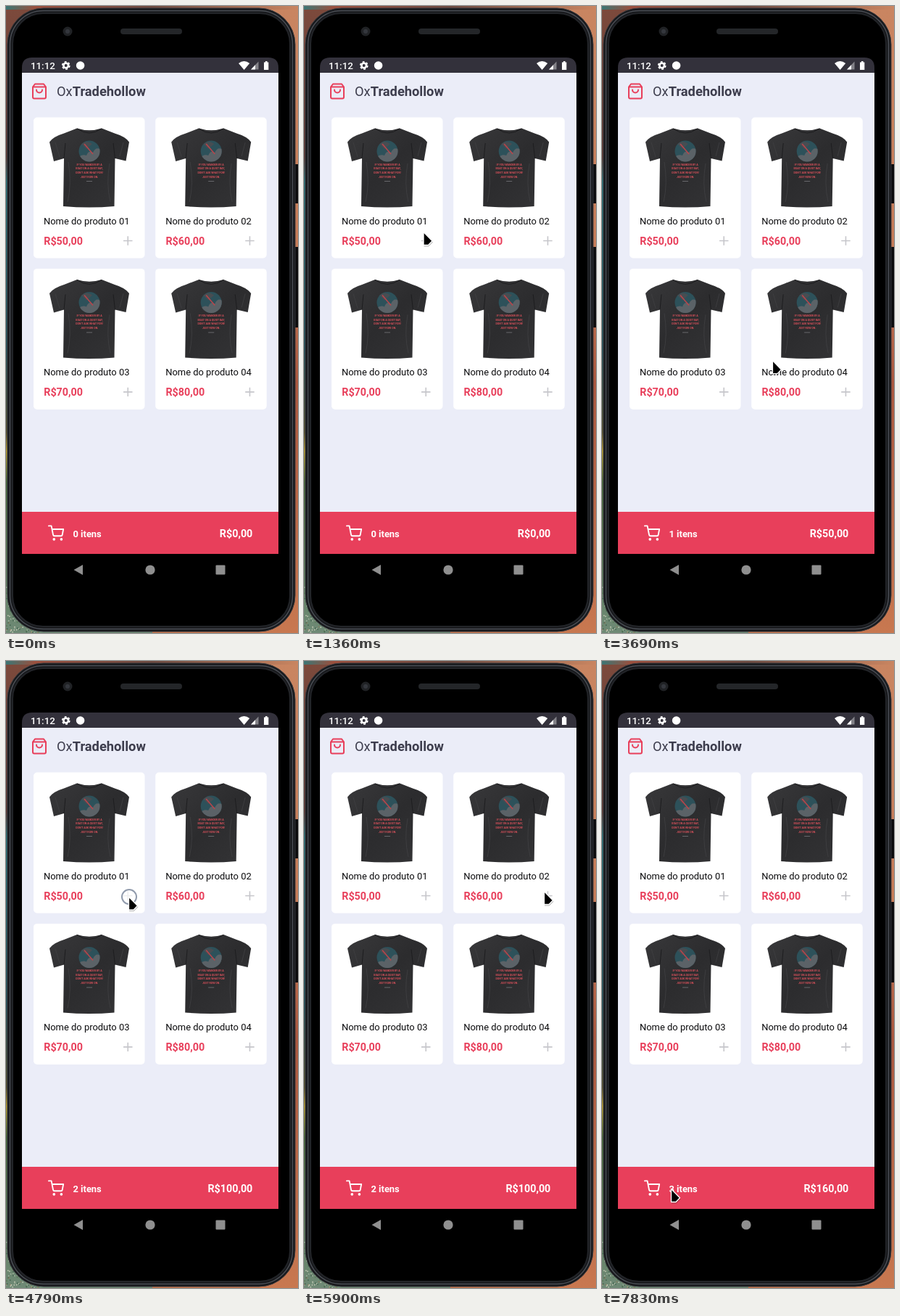
An HTML page that plays this animation: 403 by 864 pixels, repeating every 8000 ms.

```html
<!DOCTYPE html>
<html lang="pt">
<head>
<meta charset="utf-8">
<title>Shop cart</title>
<style>
  html, body { margin: 0; width: 100%; height: 100%; overflow: hidden; background: #000; }
  svg { display: block; width: 100vw; height: 100vh; font-family: Roboto, Arial, sans-serif; }
  .name { font-size: 12.95px; fill: #0c0c0e; }
  .price { font-size: 14.3px; font-weight: 700; fill: #e83f5b; }
  .print { font-size: 3.6px; font-weight: 700; fill: #d4505a; text-anchor: middle; }
  .total { font-size: 14.3px; font-weight: 700; fill: #fff; text-anchor: end; }
  .count { font-size: 12.9px; font-weight: 700; fill: #fff; }
  .line { fill: none; stroke-width: 2; stroke-linecap: round; stroke-linejoin: round; }
</style>
</head>
<body>
<svg viewBox="0 0 403 864" preserveAspectRatio="none">
  <defs>
    <linearGradient id="left" x2="0" y2="1">
      <stop offset="0" stop-color="#7d4a3c"/>
      <stop offset=".24" stop-color="#5d3a35"/>
      <stop offset=".28" stop-color="#2d7277"/>
      <stop offset=".55" stop-color="#28525a"/>
      <stop offset=".68" stop-color="#56502f"/>
      <stop offset=".71" stop-color="#b39a2e"/>
      <stop offset=".76" stop-color="#48693a"/>
      <stop offset="1" stop-color="#6f8a76"/>
    </linearGradient>
    <linearGradient id="right" x2="0" y2="1">
      <stop offset="0" stop-color="#c98561"/>
      <stop offset=".4" stop-color="#c67c58"/>
      <stop offset=".6" stop-color="#a9573f"/>
      <stop offset="1" stop-color="#c87850"/>
    </linearGradient>
    <linearGradient id="top">
      <stop offset="0" stop-color="#3c7674"/>
      <stop offset=".1" stop-color="#9a4f3d"/>
      <stop offset=".5" stop-color="#6d4a40"/>
      <stop offset="1" stop-color="#c98561"/>
    </linearGradient>
    <linearGradient id="cloth" x2="1" y2="1">
      <stop offset="0" stop-color="#38383a"/>
      <stop offset=".5" stop-color="#2c2c2e"/>
      <stop offset="1" stop-color="#343436"/>
    </linearGradient>
    <clipPath id="disc"><circle cx="115" cy="200" r="14.5"/></clipPath>

    <g id="shirt">
      <path fill="url(#cloth)" d="M98 168.5Q115 174 132 168.5L150 175.500Q165 180 170 187.500L165.500 213.500L150.500 210L149.500 276Q115 279 79 276L80 210L66 214L60 187.500Q65 180 80 175.500Z"/>
      <path fill="none" stroke="#1d1d1f" d="M98 169Q115 181 132 169M80 210L82 189M150.500 210L148 189"/>
      <path fill="none" stroke="#414143" stroke-width=".8" d="M86 215Q91 245 85 270M143 217Q138 245 144 270M68 188L74 208M162 188L157 207"/>
      <circle cx="115" cy="200" r="14.500" fill="#2d515a"/>
      <g clip-path="url(#disc)">
        <path fill="#5b6267" d="M98 211Q104 203 111 206Q114 198 120 202Q124 193 131 198V216H98Z"/>
        <path fill="#474d52" d="M104 190Q111 184 119 190L111 197Z"/>
        <path stroke="#b8454b" stroke-width="1.600" d="M108 190L120 204"/>
      </g>
      <g class="print">
        <text x="115" y="219.800">IF YOU WANDER BY A</text>
        <text x="115" y="225.400">BOAT ON A QUIET BAY,</text>
        <text x="115" y="231">DON'T ASK WHAT FOR!</text>
        <text x="115" y="236.600">JUST ROW ON.</text>
      </g>
      <path stroke="#77777a" stroke-width=".8" d="M111 241.500H119"/>
    </g>
  </defs>

  <!-- wallpaper -->
  <rect width="202" height="864" fill="url(#left)"/>
  <rect x="202" width="201" height="864" fill="url(#right)"/>
  <rect width="403" height="5" fill="url(#top)"/>
  <g id="specks"></g>

  <!-- phone -->
  <path fill="#0b0b0d" d="M398 218h5v54h-5zM398 332h5v111h-5z"/>
  <rect x="2" y="3" width="397" height="859" rx="50" fill="#17181b" stroke="#34373c"/>
  <rect x="5.500" y="6.500" width="390" height="852" rx="46" fill="none" stroke="#4a4e55" stroke-width="1.500"/>
  <rect x="9" y="10" width="383" height="845" rx="42" fill="#000" stroke="#222428" stroke-width="2"/>
  <circle cx="85" cy="35" r="6.500" fill="#202225"/>
  <circle cx="85" cy="35" r="3" fill="#34373d"/>
  <rect x="158" y="31" width="85" height="8" rx="4" fill="#242629"/>

  <!-- status bar -->
  <path fill="#33313b" d="M22 92.500V85Q22 71 36 71H362Q376 71 376 85V92.500Z"/>
  <g fill="#fff">
    <text x="34" y="86.700" font-size="13.300" font-weight="500">11:12</text>
    <g fill="none" stroke="#fff">
      <circle cx="82.700" cy="82" r="3.300" stroke-width="2.600"/>
      <circle cx="82.700" cy="82" r="5" stroke-width="1.800" stroke-dasharray="2.800 2.436"/>
    </g>
    <circle cx="102.600" cy="82" r="5.800"/>
    <path d="M321 79Q328.500 73 336.200 79L328.600 88Z"/>
    <path opacity=".4" d="M338 87.500L348.500 76.500V87.500Z"/>
    <path d="M338 87.500L344 81.200V87.500Z"/>
    <path d="M356 77.500H358V76H360.500V77.500H362.300V88H356Z"/>
  </g>

  <!-- app -->
  <rect x="22" y="92" width="354" height="605" fill="#ebedf8"/>
  <g class="line" stroke="#e83f5b" transform="translate(34 105.500)">
    <path d="M6 2L3 6v14a2 2 0 0 0 2 2h14a2 2 0 0 0 2-2V6l-3-4zM3 6H21M16 10a4 4 0 0 1-8 0"/>
  </g>
  <text x="70" y="124" font-size="18.300" fill="#3d3d4d">Ox<tspan font-weight="700">Tradehollow</tspan></text>
  <g id="cards"></g>

  <rect x="22" y="697" width="354" height="58" fill="#e83f5b"/>
  <g class="line" stroke="#fff" transform="translate(58 715.500) scale(.92)">
    <path d="M1 1h4l2.680 13.390a2 2 0 0 0 2 1.610h9.720a2 2 0 0 0 2-1.610L23 6H6"/>
    <circle cx="9" cy="21" r="1"/><circle cx="20" cy="21" r="1"/>
  </g>
  <text id="count" class="count" x="92.500" y="731.800"></text>
  <text id="total" class="total" x="340.300" y="732"></text>

  <!-- navigation -->
  <g fill="#8f8f8f">
    <path d="M93.500 777L106 770V784Z"/>
    <circle cx="199" cy="777" r="6.600"/>
    <rect x="289.500" y="770.500" width="13" height="13" rx="1"/>
  </g>

  <circle id="ring" fill="#fff" fill-opacity=".72" stroke="#8f99ab" stroke-width="2"/>
  <g id="cursor">
    <path d="M.5 1.500L13 14L7 20H.5Z" fill="#000" opacity=".25"/>
    <path d="M0 0L12 12.300L6.500 18H0Z" fill="#000" stroke="#fff" stroke-width="1.300" stroke-linejoin="round"/>
  </g>
</svg>

<script>
const LOOP = 8000, STEP = 40;
const $ = id => document.getElementById(id);
const money = n => `R$${n},00`;

// Each move is a run of [time, x, y]; the pointer rests between moves.
const moves = [
  [[600, 398, 631], [720, 330, 560], [880, 210, 420], [1040, 110, 320], [1120, 85, 294],
   [1240, 122, 297], [1360, 165, 311.5], [1400, 164, 313]],
  [[1440, 161, 314], [1520, 156, 319], [1600, 160, 324]],
  [[1800, 161, 324], [1860, 162.5, 324]],
  [[3030, 162.5, 324], [3150, 185, 400], [3330, 290, 640], [3450, 322, 734],
   [3560, 300, 650], [3710, 212, 430], [3810, 181, 345]],
  [[3880, 179, 342], [4080, 166.500, 324], [4210, 169.5, 325]],
  [[5090, 169.5, 325], [5200, 147, 420], [5320, 134, 590], [5400, 148, 655],
   [5600, 250, 510], [5780, 320, 345], [5860, 329, 315]],
  [[5900, 331.5, 317.5], [6220, 339.5, 323.5]],
  [[6980, 339.5, 323.5], [7100, 310, 390], [7400, 170, 640], [7700, 98, 728]],
  [[7830, 95.5, 727.5]]
];

const clicks = [
  { at: 2000, end: 2290, price: 50 },
  { at: 4590, end: 4950, price: 50 },
  { at: 6540, end: 6820, price: 60 }
];
const REACT = 120;

function buildCards() {
  $('cards').innerHTML = [0, 1, 2, 3].map(i => `
    <g transform="translate(${i % 2 * 168.2} ${(i >> 1) * 208.4})">
      <rect x="38" y="153.500" width="153.500" height="194" rx="5" fill="#fff"/>
      <use href="#shirt"/>
      <text class="name" x="52" y="301">Nome do produto 0${i + 1}</text>
      <text class="price" x="52.300" y="329">${money(50 + i * 10)}</text>
      <path d="M162 323.500H174.500M168.250 317.300V329.700" stroke="#c6c6cb" stroke-width="1.600"/>
    </g>`).join('');
}

function buildSpecks() {
  let seed = 7;
  const rand = () => (seed = seed * 16807 % 2147483647) / 2147483647;
  const tones = ['#a9b8a4', '#3f5f4c', '#c9cdb8', '#54774f', '#8a7b5c'];
  let out = '';
  for (let i = 0; i < 260; i++) {
    const x = rand() * 45, y = 800 + rand() * 64;
    out += `<rect x="${x}" y="${y}" width="1.5" height="1.5" fill="${tones[i % tones.length]}"/>`;
  }
  $('specks').innerHTML = out;
}

function pointer(t) {
  const run = moves.filter(m => m[0][0] <= t).pop();
  if (!run) return null;
  const start = run[0][0], last = run[run.length - 1];
  if (t >= last[0]) return [last[1], last[2]];
  const time = start + Math.floor((t - start) / STEP) * STEP;
  const i = run.findIndex(p => p[0] > time);
  const [t0, x0, y0] = run[i - 1], [t1, x1, y1] = run[i];
  const k = (time - t0) / (t1 - t0);
  return [x0 + (x1 - x0) * k, y0 + (y1 - y0) * k];
}

function draw(t) {
  const pos = pointer(t);
  $('cursor').style.display = pos ? '' : 'none';
  if (pos) $('cursor').setAttribute('transform', `translate(${pos})`);

  const bought = clicks.filter(c => t >= c.at + REACT);
  $('count').textContent = `${bought.length} itens`;
  $('total').textContent = money(bought.reduce((sum, c) => sum + c.price, 0));

  const click = clicks.find(c => t >= c.at && t < c.end);
  const ring = $('ring');
  ring.style.display = click ? '' : 'none';
  if (click) {
    const p = Math.floor((t - click.at) / STEP) * STEP / (click.end - click.at);
    ring.setAttribute('cx', pos[0] + .5);
    ring.setAttribute('cy', pos[1]);
    ring.setAttribute('r', 11 - 5 * (1 - p) ** 2);
    ring.setAttribute('opacity', Math.min(1, (1 - p) * 2.2));
  }
}

buildCards();
buildSpecks();
const begin = performance.now();
function tick() {
  draw((performance.now() - begin) % LOOP);
  requestAnimationFrame(tick);
}
tick();
</script>
</body>
</html>
```
